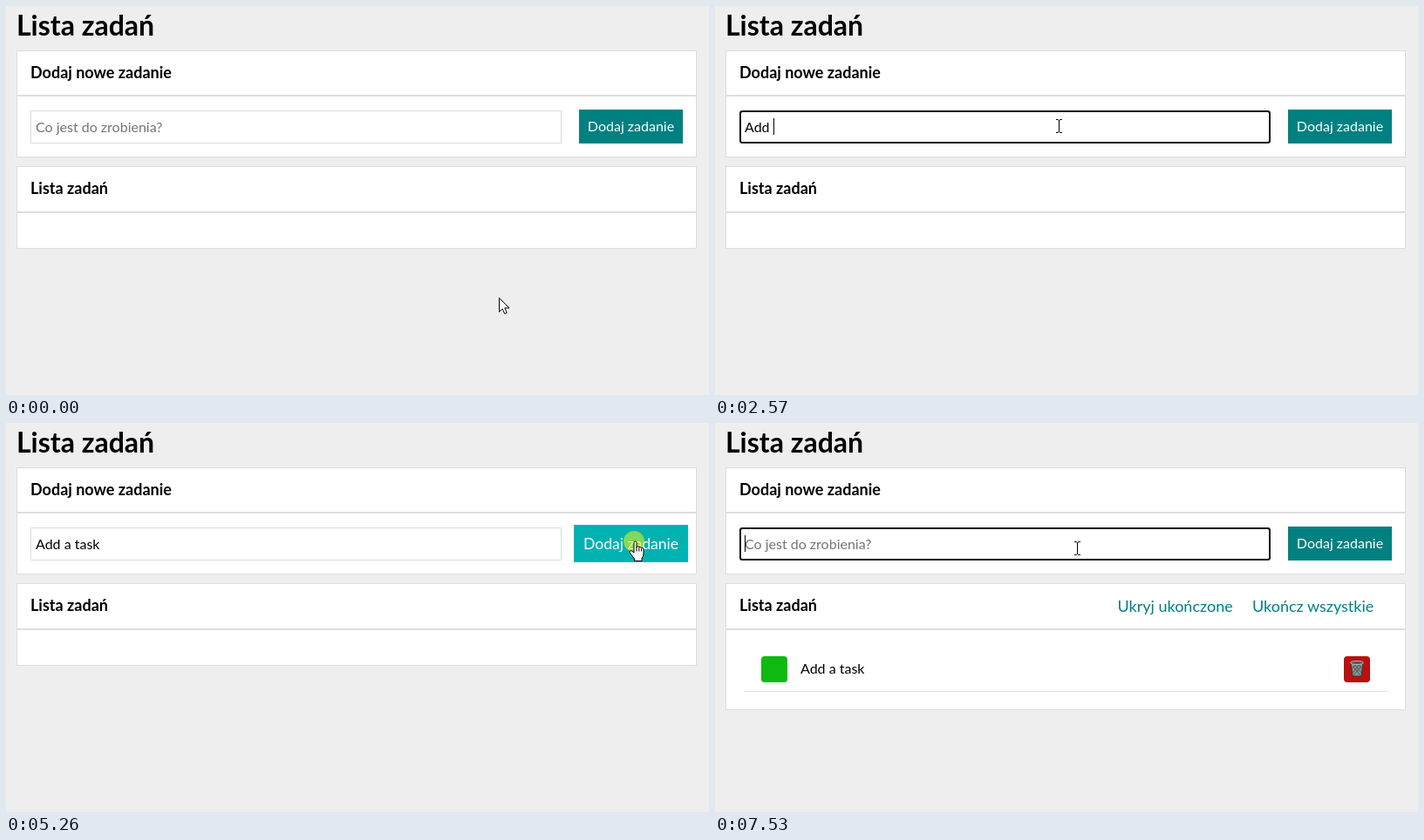
An HTML page for the animation above (7990 ms loop, 806 by 447 pixels).

```html
<!DOCTYPE html>
<html lang="pl">
<head>
<meta charset="utf-8">
<title>Lista zadań</title>
<style>
html, body { margin: 0; width: 100%; height: 100%; overflow: hidden; background: #eee; }
svg { display: block; font: 16px Lato, sans-serif; }
.panel rect, #field { fill: #fff; stroke: #ddd; }
.h1 { font-size: 32px; font-weight: 700; }
.h2 { font-size: 18px; font-weight: 700; }
.link { font-size: 18px; fill: teal; }
text { white-space: pre; }
</style>
</head>
<body>
<svg width="806" height="447" viewBox="0 0 806 447">
  <rect width="806" height="447" fill="#eee"/>
  <text class="h1" x="12" y="34">Lista zadań</text>

  <g class="panel">
    <rect x="12.5" y="51.5" width="779" height="51"/>
    <rect x="12.5" y="103.5" width="779" height="70"/>
    <rect x="12.5" y="184.5" width="779" height="52"/>
    <rect id="body" x="12.5" y="237.5" width="779" height="41"/>
  </g>
  <text class="h2" x="28" y="83">Dodaj nowe zadanie</text>
  <text class="h2" x="28" y="216">Lista zadań</text>

  <rect id="field" x="28.5" y="120.5" width="608" height="37"/>
  <rect id="ring" x="29" y="121" width="607" height="36" rx="2.5" fill="#fff" stroke="#101010" stroke-width="2"/>
  <text id="hint" x="34" y="145" fill="#757575">Co jest do zrobienia?</text>
  <text id="value" x="34" y="145"></text>
  <rect id="caret" y="129" width="1" height="19"/>

  <g id="button">
    <rect id="face" x="657" y="119" width="119" height="39"/>
    <text x="716.5" y="144" fill="#fff" text-anchor="middle">Dodaj zadanie</text>
  </g>

  <g id="list">
    <text class="link" x="461.5" y="217">Ukryj ukończone</text>
    <text class="link" x="616" y="217">Ukończ wszystkie</text>
    <rect x="53" y="268" width="30" height="30" rx="4" fill="#10b910"/>
    <text x="98" y="288">Add a task</text>
    <rect x="721" y="268" width="30" height="30" rx="4" fill="#b91010"/>
    <path d="M729 276H743L741 291H731Z" fill="#8d9191" stroke="#333" stroke-linejoin="round"/>
    <path d="M731 279l9 11M734 278l7 9M738 278l4 5M741 279l-9 11M738 278l-7 9M734 278l-4 5" stroke="#454949" stroke-width=".8"/>
    <ellipse cx="736" cy="275.5" rx="7.5" ry="2" fill="#555" stroke="#b5baba"/>
    <path d="M33 308.5H771" stroke="#ddd"/>
  </g>

  <circle id="click" r="12" fill="#ff0" fill-opacity=".5"/>
  <g id="arrow">
    <path d="M.5 .5V16.5L4.2 13L6.7 18.6L9.2 17.5L6.8 12H12Z" fill="#fff" stroke="#000"/>
  </g>
  <g id="beam" fill="none">
    <path d="M-3 -7.5H-1L.5 -6.5L2 -7.5H4M.5 -6.5V6.5M-3 7.5H-1L.5 6.5L2 7.5H4" stroke="#fff" stroke-width="2.4" opacity=".6"/>
    <path d="M-3 -7.5H-1L.5 -6.5L2 -7.5H4M.5 -6.5V6.5M-3 7.5H-1L.5 6.5L2 7.5H4" stroke="#000"/>
  </g>
  <g id="hand">
    <path d="M-2 13V1.5Q-2 0 -.5 0T1 1.5V7Q1 5.7 2.4 5.7T3.8 7.2Q4 6.3 5.2 6.5T6.5 8Q6.8 7.3 7.8 7.6T9 9.2V14Q9 17 7 19.5V22.5H-1.5V20L-6.5 13.5Q-7.5 12 -6.4 11T-4 11.5Z" fill="#fff" stroke="#000" stroke-linejoin="round"/>
    <path d="M1 7V11.5M3.8 7.5V11.5M6.5 8.3V11.5" stroke="#000"/>
  </g>
</svg>
<script>
const LOOP = 7990, TICK = 68.2;
const FOCUS = 890, PRESS = 5190, RELEASE = 5360;
const HOVER_IN = 4810, HOVER_OUT = 5830, HOVER_TIME = 300;
const TASK = 'Add a task';
const KEYS = [2040, 2240, 2380, 2490, 2600, 2720, 2830, 2970, 3100, 3230];
// time, x, y of the pointer after its first move
const PATH = [
  [4172, 394, 138], [4310, 402, 140], [4500, 470, 150], [4650, 560, 155],
  [4780, 653, 155], [4853, 692, 150], [4920, 716, 141], [5060, 722, 136],
  [5600, 722, 136], [5740, 702, 140], [5810, 655, 143], [5880, 575, 140],
  [5950, 524, 138], [6020, 488, 144], [6200, 440, 144], [6510, 415, 144]
];

const el = {};
document.querySelectorAll('[id]').forEach(node => el[node.id] = node);
const show = (node, on) => node.setAttribute('visibility', on ? 'visible' : 'hidden');
const move = (node, x, y) => node.setAttribute('transform', `translate(${x} ${y})`);
const clamp = p => Math.min(1, Math.max(0, p));
const mix = (a, b, p) => a + (b - a) * p;
const within = (t, a, b) => t >= a && t < b;

// CSS "ease": cubic-bezier(.25, .1, .25, 1)
function ease(p) {
  let lo = 0, hi = 1;
  for (let i = 0; i < 20; i++) {
    const s = (lo + hi) / 2;
    const x = .75 * s * (1 - s) + s ** 3;
    if (x < p) lo = s; else hi = s;
  }
  return .3 * lo * (1 - lo) ** 2 + 3 * lo * lo * (1 - lo) + lo ** 3;
}

function pointer(t) {
  if (t < PATH[0][0]) {
    const p = clamp(t / 690), s = p * p * (3 - 2 * p);
    return [mix(565, 394, s), mix(335, 138, s)];
  }
  const i = PATH.findIndex(k => k[0] > t);
  if (i < 0) return PATH[PATH.length - 1].slice(1);
  const a = PATH[i - 1], b = PATH[i], p = (t - a[0]) / (b[0] - a[0]);
  return [mix(a[1], b[1], p), mix(a[2], b[2], p)];
}

function draw(t) {
  const step = 4240 + Math.floor((t - 4240 + 5) / TICK) * TICK;
  const done = t >= RELEASE;
  const focused = within(t, FOCUS, PRESS) || done;
  const typed = done ? 0 : KEYS.filter(k => k <= t).length;

  show(el.ring, focused);
  show(el.hint, !typed);
  el.value.textContent = TASK.slice(0, typed);

  const since = done ? RELEASE : t < KEYS[0] ? FOCUS : KEYS[typed - 1];
  show(el.caret, focused && Math.floor((t - since) / 537) % 2 === 0);
  el.caret.setAttribute('x', typed ? Math.round(34 + el.value.getComputedTextLength()) : 34);

  const hover = ease(clamp((step - HOVER_IN) / HOVER_TIME)) - ease(clamp((step - HOVER_OUT) / HOVER_TIME));
  const tone = Math.round(mix(128, 178, hover));
  el.face.setAttribute('fill', `rgb(0,${tone},${tone})`);
  el.button.setAttribute('transform',
    `translate(716.5 138.5) scale(${1 + hover * .1}) translate(-716.5 -138.5)`);

  show(el.list, done);
  el.body.setAttribute('height', done ? 92 : 41);

  const [x, y] = pointer(Math.max(0, step)).map(Math.round);
  const inRow = y >= 119 && y < 158;
  const shape = inRow && within(x, 28, 637) ? 'beam' : inRow && within(x, 655, 780) ? 'hand' : 'arrow';
  for (const name of ['arrow', 'beam', 'hand']) {
    show(el[name], name === shape);
    move(el[name], x, y);
  }
  show(el.click, within(t, FOCUS, 1040) || within(t, PRESS, RELEASE));
  move(el.click, x - 2, y);
}

const start = performance.now();
function frame() {
  draw((performance.now() - start) % LOOP);
  requestAnimationFrame(frame);
}
frame();
</script>
</body>
</html>
```
